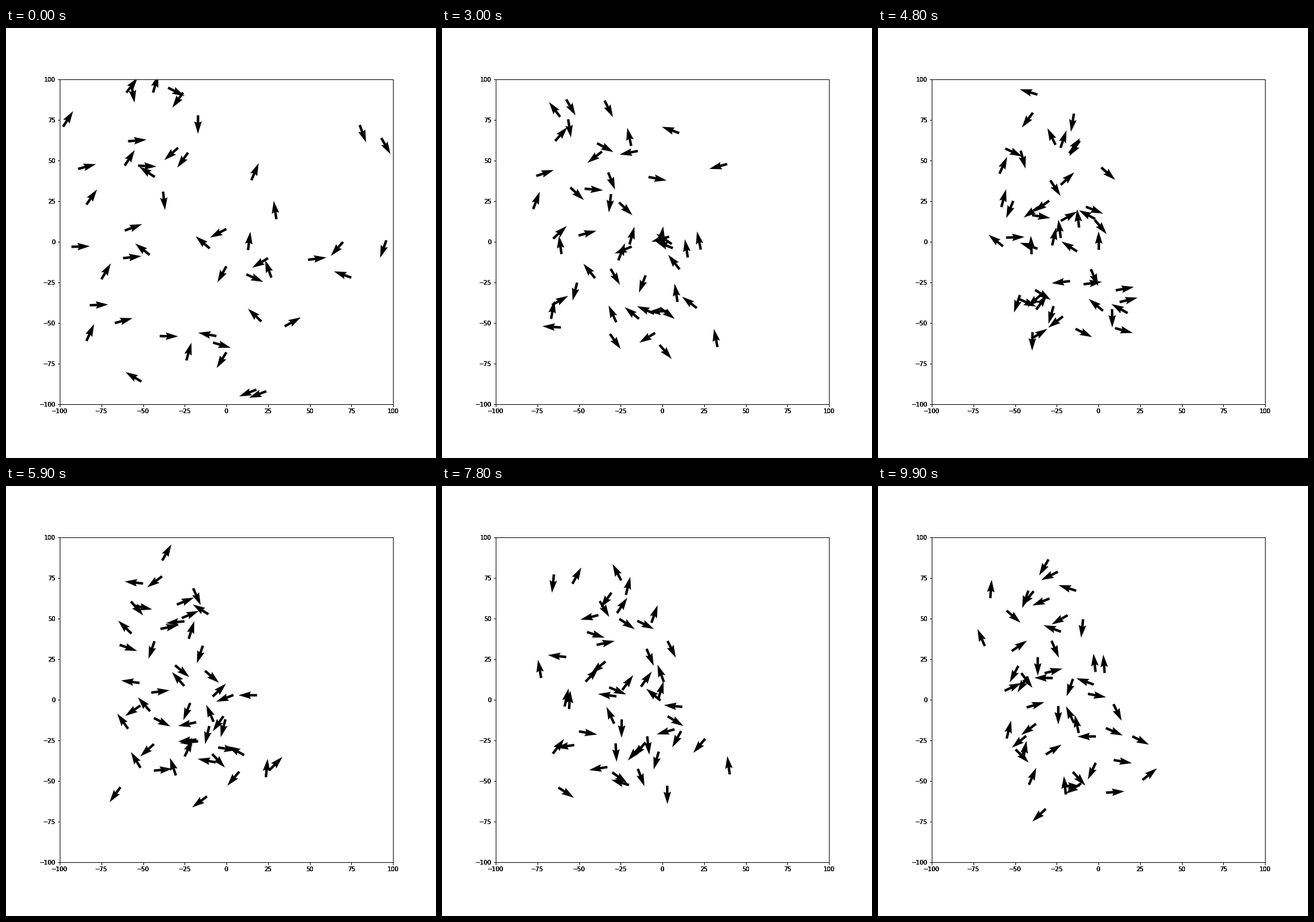
Animation, 720 px wide and 720 px high, one loop 10 s. Source, as a matplotlib script:

```python
import numpy as np
import matplotlib.pyplot as plt
from matplotlib.animation import FuncAnimation

STEPS = 100
SPEED = 4.0
GATHER = 40  # steps until the swarm has closed up

START = np.array([
    (-57, 97), (-60, 92), (-44, 92), (-35, 95), (-26, 92), (-17, 78), (-98, 71),
    (80, 72), (93, 64), (-59, 62), (-29, 58), (-23, 55), (-89, 45), (-53, 47),
    (-61, 47), (-43, 40), (-38, 31), (15, 38), (-84, 23), (-61, 7), (0, 8),
    (30, 14), (70, 0), (96, 1), (-93, -3), (-62, -10), (-46, -8), (-10, -4),
    (13, -5), (25, -10), (49, -11), (-75, -23), (0, -15), (12, -20), (27, -22),
    (75, -22), (-82, -39), (-67, -50), (21, -49), (35, -52), (-84, -61),
    (-40, -58), (-6, -58), (-24, -73), (-8, -62), (0, -68), (-51, -86),
    (18, -91), (24, -92), (104, -104),
], float)


def swarm_spots(rng):
    """Jittered rows in a patch that widens to the lower right."""
    rows = np.linspace(0, 1, 11)
    counts = np.round(np.linspace(2.6, 6.5, 11)).astype(int)
    spots = []
    for f, n in zip(rows, counts):
        xs = np.linspace(-50 - 5 * f, -22 + 45 * f, n)
        spots += [(x, 77 - 125 * f) for x in xs]
    return np.array(spots) + rng.normal(0, 2.5, (len(spots), 2))


def pair(start, spots):
    """Give every bird a free spot nearby, outermost birds first."""
    free = list(range(len(spots)))
    chosen = np.zeros(len(start), int)
    reach = np.linalg.norm(start - spots.mean(0), axis=1)
    for i in np.argsort(-reach):
        best = min(free, key=lambda k: np.hypot(*(spots[k] - start[i])))
        free.remove(best)
        chosen[i] = best
    return spots[chosen]


def flight():
    """Constant speed, each bird turning back towards a drifting home."""
    rng = np.random.default_rng(8)
    goal = pair(START, swarm_spots(rng))
    # birds on the left come in heading right and up
    angle = np.where(START[:, 0] < -60, rng.uniform(0, 1.4, len(START)),
                     rng.uniform(-np.pi, np.pi, len(START)))
    pos = START
    path, angles = [], []
    for t in range(STEPS):
        path.append(pos)
        angles.append(angle)
        pos = pos + SPEED * np.stack([np.cos(angle), np.sin(angle)], 1)
        home = START + (goal - START) * min((t + 1) / GATHER, 1)
        dx, dy = (home - pos).T
        off = (np.arctan2(dy, dx) - angle + np.pi) % (2 * np.pi) - np.pi
        pull = 0.6 * np.minimum(np.hypot(dx, dy) / 15, 1)
        angle = angle + pull * np.clip(off, -1, 1) + rng.normal(0, 0.25, len(pos))
    return np.array(path), np.array(angles)


path, angles = flight()

plt.rcParams.update({"font.family": "DejaVu Sans", "font.size": 10})
fig = plt.figure(figsize=(10, 10), dpi=72, facecolor="white")

# stacked axes give the heavy tick labels
for layer in range(4):
    ax = fig.add_axes([0.125, 0.125, 0.775, 0.755], label=f"layer{layer}")
    ax.patch.set_visible(False)
    ax.set(xlim=(-100, 100), ylim=(-100, 100),
           xticks=range(-100, 101, 25), yticks=range(-100, 101, 25))

birds = ax.quiver(*path[0].T, np.cos(angles[0]), np.sin(angles[0]),
                  color="black", scale=18, width=0.0075)


def update(i):
    birds.set_offsets(path[i])
    birds.set_UVC(np.cos(angles[i]), np.sin(angles[i]))
    return birds,


anim = FuncAnimation(fig, update, frames=STEPS, interval=100,
                     repeat=True, repeat_delay=0)
plt.show()
```
